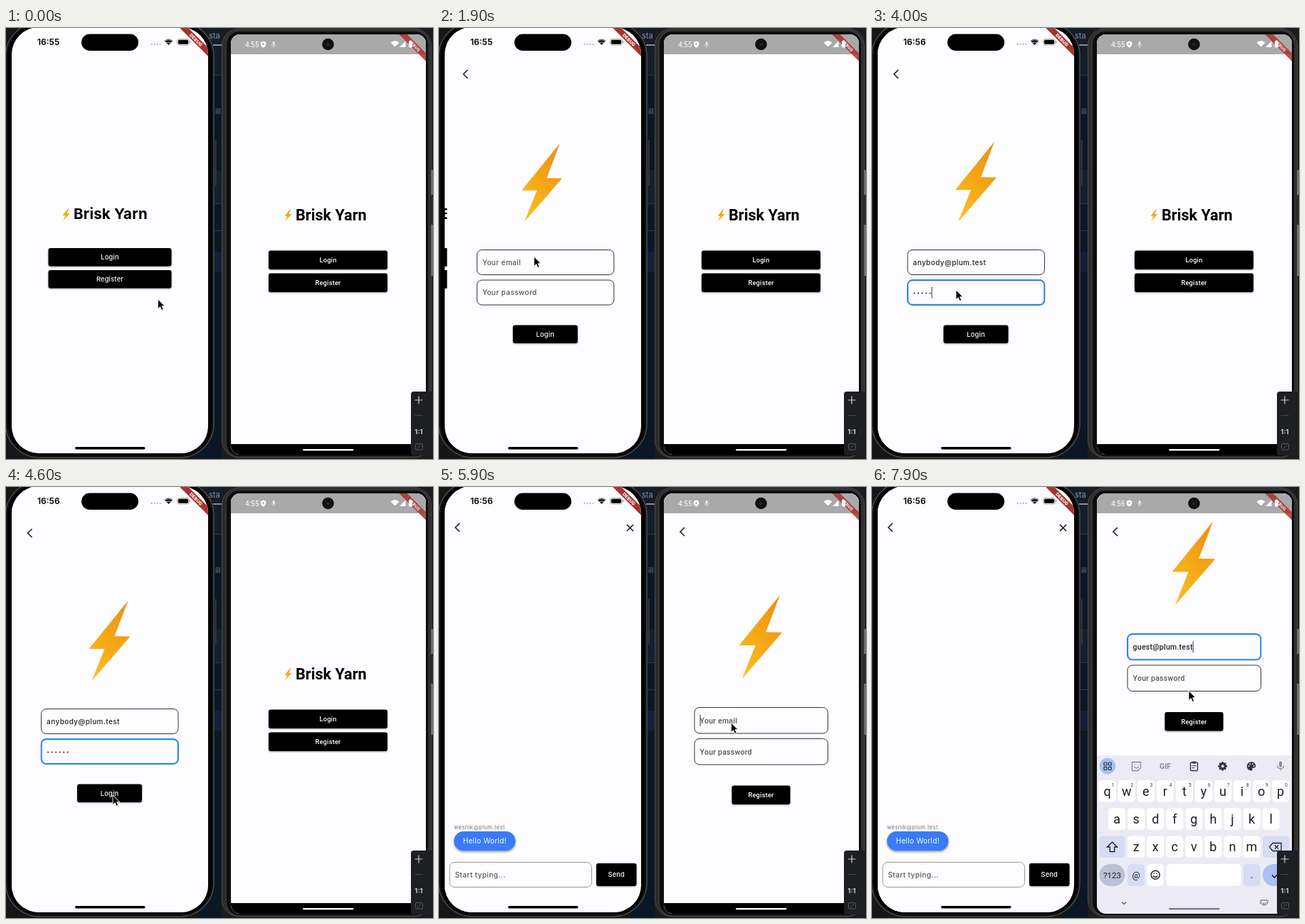
These frames come from a looping animation (600x607 px, 8000 ms). An HTML page:

```html
<!DOCTYPE html>
<html lang="en">
<head>
<meta charset="utf-8">
<title>Two phones chat demo</title>
<style>
  html, body { margin: 0; width: 100%; height: 100%; overflow: hidden; background: #0c1520; }
  svg { display: block; width: 600px; height: 607px; }
  text { white-space: pre; }
  .ios { font-family: Inter, "Open Sans", sans-serif; }
  .droid { font-family: Roboto, "Noto Sans", sans-serif; }
  .lift { filter: drop-shadow(0 1px 1px rgba(0, 0, 0, .4)); }
</style>
</head>
<body>
<svg id="stage" viewBox="0 0 600 607" xmlns="http://www.w3.org/2000/svg"></svg>
<script>
const LOOP = 8000, PAPER = '#fdfcfe';
const $ = id => document.getElementById(id);

// ---- markup helpers ----
const rect = (x, y, w, h, r, fill, more = '') =>
  `<rect x="${x}" y="${y}" width="${w}" height="${h}" rx="${r}" fill="${fill}" ${more}/>`;
const text = (x, y, s, size, fill = '#000', more = '') =>
  `<text x="${x}" y="${y}" font-size="${size}" fill="${fill}" ${more}>${s}</text>`;
const line = (d, color, w = 1, more = '') =>
  `<path d="${d}" fill="none" stroke="${color}" stroke-width="${w}" ${more}/>`;
const shape = (d, fill, more = '') => `<path d="${d}" fill="${fill}" ${more}/>`;
const disc = (x, y, r, fill, more = '') => `<circle cx="${x}" cy="${y}" r="${r}" fill="${fill}" ${more}/>`;
const group = (id, body, more = '') => `<g id="${id}" ${more}>${body}</g>`;
const MID = 'text-anchor="middle"';

const button = (x, y, w, h, label, size, weight) =>
  rect(x, y, w, h, 3, '#000', 'class="lift"') +
  text(x + w / 2, y + h / 2 + size * .35, label, size, '#fff', `${MID} font-weight="${weight}" letter-spacing=".2"`);

const field = (id, x, y, w, h, size, spacing) => group(id,
  rect(x, y, w, h, 7, 'none', 'stroke="#333" stroke-width="1"') +
  rect(x + .2, y + .2, w - .4, h - .4, 6.5, PAPER, 'class="ring" stroke="#2486f0" stroke-width="2"') +
  text(x + 7.6, y + h / 2 + size * .36, '', size, '#444', `class="value" font-weight="450" letter-spacing="${spacing}"`) +
  line('', '#222', 2, 'class="dots" stroke-dasharray="0 5.5" stroke-linecap="round"') +
  rect(x + 7.6, y + h / 2 - 8, 1, 16, 0, '#334', 'class="caret"'),
  `data-x="${x + 7.6}" data-y="${y + h / 2}"`);

const back = (x, y) => line(`M${x + 3} ${y - 6}l-6 6 6 6`, '#222', 1.6);
const bolt = id => group(id, shape('M26-56.5L7-6.5 29-6-25 56.5-7 11.5-29 11.5Z', 'url(#gold)'));
const wifi = (x, y, fill) => shape(`M${x} ${y + 4}l-6-6q6-5 12 0Z`, fill);
const banner = (x, y, k, opacity) =>
  `<g transform="translate(${x} ${y}) rotate(45) scale(${k})" opacity="${opacity}">` +
  rect(-45, 28, 90, 12, 0, '#a8322f') +
  text(0, 37.3, 'DEBUG', 9, '#fff', `${MID} font-weight="800" letter-spacing=".3"`) + '</g>';

// ---- scenery between and behind the phones ----
const backdrop =
  rect(0, 0, 600, 607, 0, '#151617') +
  rect(270, 0, 34, 607, 0, '#0b1724') + rect(270, 0, 34, 66, 0, '#141d28') +
  rect(292, 200, 11, 47, 0, '#13202f') + rect(292, 315, 11, 28, 0, '#14203a') +
  rect(294, 158, 1.5, 64, 0, '#4a3c34') +
  line('M291 24h12', '#aeb4bb', 1.5) + line('M292 66.5h11M292 247.5h11M292 285.5h11', '#2c3a49') +
  `<g class="ios">${text(285, 15, 'sta', 11, '#8b929b')}${text(294, 121, 'ill', 10.5, '#727a84')}</g>`;

const iosBody =
  rect(-.5, -8, 292.5, 613, 48, '#000', 'stroke="#4a4a4c" stroke-width="1.6"') +
  rect(1.5, -6, 288.5, 609, 46, '#000', 'stroke="#1c1c1d" stroke-width="1"');

const droidBody =
  rect(303, 0, 297, 607, 0, '#1b1c1d') +
  rect(303.5, 1, 294, 604, 24, '#2a2b2c', 'stroke="#4b4c4d"') +
  rect(309, 4, 285, 600, 19, '#0d0d0e', 'stroke="#3b3c3d" stroke-width="1.5"') +
  rect(597, 200, 3, 35, 0, '#6d6e70') + rect(597, 237, 3, 39, 0, '#2b2c2e') + rect(597, 277, 3, 72, 0, '#6d6e70');

// ---- left phone ----
const iosWelcome = group('iosWelcome', rect(8, -2, 276, 602, 0, PAPER) +
  text(95, 269, 'Brisk Yarn', 20.5, '#000', 'font-weight="700" letter-spacing=".2"') +
  button(59.5, 310, 173, 25.5, 'Login', 9.3, 450) + button(59.5, 341, 173, 25.5, 'Register', 9.3, 450));

const iosLogin = group('iosLogin', rect(8, -2, 276, 602, 0, PAPER) + back(34, 65) +
  field('iosMail', 50, 312.5, 192.5, 35, 10, .4) + field('iosPass', 50, 355, 192.5, 35, 10, .4) +
  button(100.5, 418.5, 91, 25.5, 'Login', 9.3, 450));

const iosChat = group('iosChat', rect(8, -2, 276, 602, 0, PAPER) + back(26, 57) +
  line('M264 53l9 9m0-9l-9 9', '#111', 1.5) +
  text(21, 482, 'wesnik@plum.test', 7.7, '#777', 'letter-spacing=".35"') +
  rect(21, 485, 86.5, 27, 13.5, '#397bfb', 'style="filter:drop-shadow(0 2px 1.5px #0006)"') +
  text(64.3, 502, 'Hello World!', 10, '#fff', `${MID} letter-spacing=".3"`) +
  rect(15, 528.5, 199.5, 35, 7, 'none', 'stroke="#999"') +
  text(22.5, 550, 'Start typing...', 10, '#555', 'font-weight="500" letter-spacing=".4"') +
  button(221, 530, 56.5, 32, 'Send', 9.3, 450));

const iosChrome =
  banner(284, 0, .702, 1) +
  rect(106, 8.5, 80, 23.5, 11.7, '#000') +
  text(44, 24.2, '16:55', 12, '#000', 'id="iosClock" font-weight="600"') +
  [205, 209, 213, 217].map(x => disc(x - .5, 23, 1.2, '#bbb')).join('') +
  wifi(228.5, 20, '#000') +
  line('M222.5 18.8q6-4.2 12 0M224.8 21.2q3.7-2.4 7.4 0', PAPER, .8) +
  rect(240.5, 15.5, 17, 8.5, 2.6, 'none', 'stroke="#999" stroke-width=".8"') +
  rect(241.8, 16.8, 14.4, 5.9, 1.6, '#000') + rect(258.4, 18.3, 1.2, 3, .6, '#999') +
  rect(97, 590, 98.5, 3.4, 1.7, '#000');

// ---- right phone ----
const droidWelcome = group('droidWelcome', rect(316, 9, 274, 592, 0, PAPER) +
  text(407, 271, 'Brisk Yarn', 21.6, '#000', 'font-weight="700"') +
  button(369, 313.5, 167, 26.5, 'Login', 9.3, 500) + button(369, 345.5, 167, 26.5, 'Register', 9.3, 500));

const droidRegister = group('droidRegister', rect(316, 9, 274, 592, 0, PAPER) + back(342, 63) +
  group('droidForm',
    field('droidMail', 359, 310.5, 187.5, 36.5, 10.5, .25) + field('droidPass', 359, 354.5, 187.5, 36.5, 10.5, .25) +
    button(411.5, 420.5, 82, 26.5, 'Register', 9.3, 500)));

const droidChrome =
  rect(316, 9, 274, 28, 0, '#aaa9aa') + banner(590, 9, .667, .85) +
  text(336, 26.7, '4:55', 10, '#fff', 'id="droidClock"') +
  shape('M361.500 18.500l3.800 1.500v3.200q-.4 3-3.800 4.600-3.400-1.600-3.800-4.600v-3.200Z', '#fff') + disc(361.5, 22.6, 1.3, '#aaa') +
  rect(374.8, 19, 2.6, 5, 1.3, '#eee') + line('M373.200 22.500q0 3 2.900 3t2.900-3M376.100 25.500v2', '#eee', .8) +
  wifi(546.5, 22.5, '#fff') + shape('M553 27h8.500v-8.500Z', '#fff') + rect(566, 18.5, 5, 9, 1, '#fff') +
  disc(452.5, 23, 8.3, '#101112') + disc(452.5, 23, 2.6, '#1d2224') ;

const glyph = (x, y, s, size = 18, more = '') => text(x, y, s, size, '#1c1c22', `${MID} ${more}`);
const key = (x, y, s, hint) => rect(x - 12, y, 24, 30.5, 4.5, '#fff') + glyph(x, y + 21.5, s) +
  (hint ? text(x + 6, y + 8.500, hint, 6.5, '#333') : '');
const row = (letters, x, y, hints = '') => [...letters].map((c, i) => key(x + 27.05 * i, y, c, hints[i])).join('');
const GREY = '#8a8a92', INK = '#33343c', TINT = '#d5dcf4';
const gear = [0, 45, 90, 135].map(a => rect(491.2, 387, 3, 12.4, .6, INK, `transform="rotate(${a} 492.700 393.200)"`)).join('');

const keyboard = group('keyboard', rect(316, 378, 274, 230, 0, '#ecebf5') +
  disc(331, 393, 11.3, '#a9c0f5') +
  [[326, 388], [332.3, 388], [326, 394.3], [332.3, 394.3]].map(([x, y]) =>
    rect(x, y, 4, 4, .8, 'none', `stroke="${INK}" stroke-width="1.2"`)).join('') +
  line('M365.500 387.500h12v8l-4 4h-8Z', GREY, 1.3) + line('M368.500 394q3 3.500 6 0M369 391h1M373 391h1', GREY, 1.2) +
  text(412, 397, 'GIF', 10.5, GREY, `${MID} font-weight="700"`) +
  rect(447.5, 388, 10, 11.5, 1, 'none', `stroke="${INK}" stroke-width="1.4"`) + rect(450, 386.5, 5, 3, .8, INK) +
  line('M449.500 392.500h6M449.500 395.500h4', INK) +
  gear + disc(492.7, 393.2, 4.6, INK) + disc(492.7, 393.2, 2, '#ecebf5') +
  shape('M533 387a6 6 0 1 0 0 12.500q2 0 1.200-2.500 0-1.500 2-1.500 3.300 0 3-3-1-5.500-6.200-5.500Z', INK) +
  [[529.5, 393], [531.2, 390], [534.8, 390], [536.6, 393]].map(p => disc(...p, 1, '#ecebf5')).join('') +
  rect(572, 386.5, 4, 8, 2, GREY) + line('M569.500 392.500q0 4 4.500 4t4.500-4M574 396.500v3', GREY, 1.2) +
  row('qwertyuiop', 330.7, 413, '1234567890') + row('asdfghjkl', 344.2, 452.3) + row('zxcvbnm', 371.2, 491.5) +
  rect(319.5, 491.5, 36, 30.5, 5, TINT) + line('M337.500 500l-7 7h3.800v6.500h6.400V507h3.800Z', '#222', 1.4) +
  rect(549, 491.5, 37.5, 30.5, 5, TINT) + line('M563 501.500h12v11h-12l-4.500-5.500ZM566 504.500l5 5m0-5l-5 5', '#222', 1.3) +
  rect(319.5, 531, 36, 31, 15.5, '#b9c0d8') + glyph(337.5, 550.5, '?123', 11.5) +
  rect(359, 531, 24, 31, 5, TINT) + glyph(371, 550.5, '@', 12.5) +
  rect(386.5, 531, 23.5, 31, 5, '#fff') + disc(398.2, 546.3, 6, 'none', 'stroke="#222" stroke-width="1.4"') +
  line('M395 547.500q3.200 4 6.400 0M395.600 544.300h1.500M399.300 544.300h1.500', '#222', 1.4) +
  rect(413.5, 531, 105, 31, 5, '#fff') +
  rect(522, 531, 23.5, 31, 5, TINT) + glyph(533.7, 551, '.', 14) +
  rect(549, 531, 37.5, 31, 15.5, '#a9c0f5') + line('M562 546.500l3.500 3.500 7-7', '#222', 1.6) +
  line('M351 584.500l3 3 3-3', '#555', 1.2) +
  rect(546, 582, 10, 4.5, .5, 'none', 'stroke="#666" stroke-width="1.800" stroke-dasharray="1.300 1"') + line('M548 588.500h6', '#666', 1.2));

const tooltip = group('tooltip', shape('M326 372h10l-5 6Z', '#7d5a78') + rect(317.5, 348, 96.5, 25.5, 12.7, '#7d5a78') +
  text(365.700, 364.2, 'See more features', 9.7, '#fff', `${MID} letter-spacing=".05"`));

const toolbar = rect(569, 512, 34, 90, 4, '#1e1f22') +
  line('M574.500 524h11M580 518.500v11', '#cfd0d3', 1.2) + line('M574.500 545.500h11', '#44464a') +
  text(580, 571.500, '1:1', 9.5, '#cfd0d3', `${MID} font-weight="700" class="ios"`) +
  rect(575.5, 585.5, 10, 8.5, 1.5, 'none', 'stroke="#55575b"') + line('M578 592l5-4.500', '#55575b');

$('stage').innerHTML = `<defs>
  <linearGradient id="gold" x1=".85" y1="0" x2=".25" y2="1"><stop stop-color="#ee8f17"/><stop offset=".55" stop-color="#f5a816"/><stop offset="1" stop-color="#fbbd22"/></linearGradient>
  <clipPath id="iosClip"><rect x="8" y="-1" width="276" height="600" rx="38"/></clipPath>
  <clipPath id="droidClip"><rect x="316" y="9" width="274" height="592" rx="13"/></clipPath></defs>` +
  backdrop + iosBody + droidBody +
  `<g class="ios" clip-path="url(#iosClip)">${iosWelcome + iosLogin + bolt('iosBolt') + iosChat + iosChrome}</g>
  <g class="droid" clip-path="url(#droidClip)">${rect(316, 9, 274, 592, 0, PAPER)}${droidWelcome + droidRegister + bolt('droidBolt')}
    ${rect(316, 586, 274, 20, 0, '#000')}${keyboard + tooltip + droidChrome}
    ${rect(417, 593, 71.5, 2.2, 1.1, '#fff', 'id="pill"')}</g>` +
  toolbar +
  group('pointer', shape('M0 0V13.500L3.200 10.600 5.300 15.400 7.700 14.300 5.600 9.700H9.700Z', '#000', 'stroke="#fff" stroke-width=".9" stroke-linejoin="round"'));

// ---- timing ----
const clamp = v => Math.min(1, Math.max(0, v));
const seg = (t, from, len) => clamp((t - from) / len);
const mix = (a, b, p) => a + (b - a) * p;
const bezier = (x1, y1, x2, y2) => x => {
  if (x <= 0 || x >= 1) return clamp(x);
  const at = (a, b, s) => 3 * a * s * (1 - s) ** 2 + 3 * b * s * s * (1 - s) + s ** 3;
  let lo = 0, hi = 1;
  for (let i = 0; i < 24; i++) {
    const m = (lo + hi) / 2;
    if (at(x1, x2, m) < x) lo = m; else hi = m;
  }
  return at(y1, y2, lo);
};
const slide = bezier(.35, .91, .33, .97), smooth = bezier(.4, 0, .2, 1), glide = bezier(.4, 0, .4, 1);

// time, x, y
const PATH = [
  [0, 213.5, 382], [60, 213.5, 382], [620, 167, 331], [950, 167, 331], [1300, 133.5, 322], [3300, 133.5, 322],
  [3550, 118, 369], [4080, 118, 369], [4350, 150, 434], [4700, 150, 434], [5080, 248, 380], [5120, 248, 380],
  [5400, 515, 359], [5520, 515, 359], [5820, 410.5, 332], [7300, 410.5, 332], [7800, 445, 287], [8000, 445, 287]
];
const MAIL = 'anybody@plum.test', MAIL2 = 'guest@plum.test';

const move = (id, x, y = 0, k = 1) => $(id).setAttribute('transform', `translate(${x} ${y}) scale(${k})`);
const show = (el, on) => el.setAttribute('opacity', +on);
const typed = (t, from, step, max) => t < from ? 0 : Math.min(max, Math.floor((t - from) / step) + 1);

function setField(id, label, value, ring, caret, dots = 0) {
  const f = $(id), part = c => f.querySelector('.' + c), x = +f.dataset.x, y = +f.dataset.y;
  const v = part('value'), words = dots ? '' : value || label;
  if (v.textContent !== words) v.textContent = words;
  v.setAttribute('fill', value ? '#222' : '#555');
  show(part('ring'), ring);
  part('dots').setAttribute('d', dots ? `M${x + 2} ${y + 1}h${(dots - 1) * 5.5 + .1}` : '');
  const end = dots ? dots * 5.5 - 1.5 : value ? v.getComputedTextLength() : 0;
  part('caret').setAttribute('x', x + end);
  show(part('caret'), caret);
}

const blink = (t, t0) => (t - t0) % 1000 < 500;

function draw(t) {
  // left phone
  const a = seg(t, 1500, 500), enter = slide(a), hero = smooth(a), chat = slide(seg(t, 4600, 500));
  move('iosWelcome', -92 * enter);
  move('iosLogin', 276 * (1 - enter) - 92 * chat);
  move('iosChat', 276 * (1 - chat));
  move('iosBolt', mix(84.5, 146, hero) - 92 * chat, mix(262, 216.5, hero), mix(.17, 1, hero));
  $('iosClock').textContent = t < 3000 ? '16:55' : '16:56';

  const mailLen = typed(t, 2500, 48, MAIL.length), passLen = typed(t, 3600, 90, 6);
  const toPass = seg(t, 3560, 160), onMail = t >= 2050 && t < 3560;
  setField('iosMail', 'Your email', MAIL.slice(0, mailLen), seg(t, 2050, 160) - toPass,
    onMail && (t > 2500 && t < 3350 || blink(t, 2050)));
  setField('iosPass', 'Your password', '', toPass, t >= 3560 && (t < 4500 || blink(t, 4000)), passLen);

  // right phone
  const b = seg(t, 5500, 300), zoom = smooth(b), kb = smooth(seg(t, 6000, 260)), up = -103.5 * kb;
  const k = mix(.85, 1, zoom), g = 1 + .05 * zoom;
  move('droidWelcome', 453 * (1 - g), 311 * (1 - g), g);
  move('droidRegister', 453 * (1 - k), 311 * (1 - k), k);
  show($('droidRegister'), seg(b, .1, .5));
  move('droidForm', 0, up);
  move('droidBolt', mix(396.3, 452, zoom), mix(263, 211, zoom) + up, mix(.165, 1.044, zoom));
  move('keyboard', 0, 230 * (1 - kb));
  show($('tooltip'), seg(t, 6300, 120) - seg(t, 6900, 120));
  $('droidClock').textContent = t < 6200 ? '4:55' : '4:56';
  $('pill').setAttribute('fill', kb > .3 ? '#77777c' : '#fff');

  const len = typed(t, 6900, 58, MAIL2.length);
  setField('droidMail', 'Your email', MAIL2.slice(0, len), seg(t, 5910, 160),
    t >= 5860 && (t > 6900 || blink(t, 5500)));
  setField('droidPass', 'Your password', '', 0, false);

  // pointer
  const i = Math.max(1, PATH.findIndex(p => p[0] > t)), [t0, x0, y0] = PATH[i - 1], [t1, x1, y1] = PATH[i];
  const p = glide(seg(t, t0, t1 - t0));
  move('pointer', mix(x0, x1, p), mix(y0, y1, p));
}

const start = performance.now();
function tick() {
  draw((performance.now() - start) % LOOP);
  requestAnimationFrame(tick);
}
tick();
</script>
</body>
</html>
```
